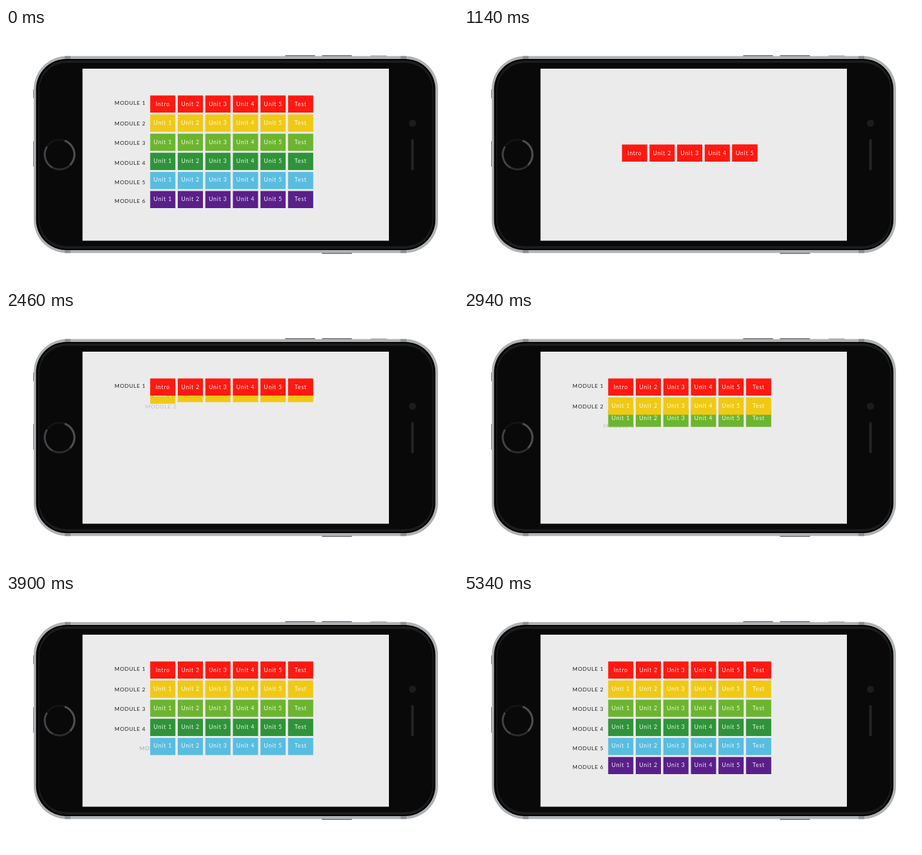
An HTML page with a canvas that plays this animation: 700x395 px, repeating every 5.37 s.

```html
<!DOCTYPE html>
<html lang="en">
<head>
<meta charset="utf-8">
<title>Course modules on a phone</title>
<style>
  html, body { margin: 0; width: 100%; height: 100%; overflow: hidden; background: #fff; }
  canvas { display: block; }
</style>
</head>
<body>
<canvas id="stage" width="700" height="395"></canvas>
<script>
const ctx = document.getElementById('stage').getContext('2d');
const LOOP = 5370, CUT = 60;
const COLORS = ['#fe1911', '#f0c915', '#6cb52f', '#2f9439', '#59bddf', '#5a1f8a'];
const PITCH_X = 42.7, PITCH_Y = 29.6, CELL_W = 39, CELL_H = 26.6;
const TOP = 104.5, MIDDLE = 180.4, LEFT = 223.3;
const LABEL_Y = [115.5, 147.5, 178, 208.5, 238.5, 267.5];

// Start times in ms
const UNIT_IN = [0, 90, 220, 350, 700, 1210];
const UNIT_MS = [0, 120, 120, 140, 240, 240];
const ROW_IN = [1725, 2363, 2805, 3248, 3655, 4105];
const LABEL_IN = [1980, 2400, 2880, 3350, 3795, 4250];

const clamp = v => Math.min(1, Math.max(0, v));
const linear = (t, start, ms) => clamp((t - start) / ms);
function ease(t, start, ms) {
  const u = linear(t, start, ms);
  return u < .5 ? 2 * u * u : 1 - 2 * (1 - u) ** 2;
}

function box(x, y, w, h, r, fill) {
  ctx.fillStyle = fill;
  ctx.beginPath();
  ctx.roundRect(x, y, w, h, r);
  ctx.fill();
}

function arc(x, y, r, from, to, color, width) {
  ctx.strokeStyle = color;
  ctx.lineWidth = width;
  ctx.beginPath();
  ctx.arc(x, y, r, from * Math.PI / 180, to * Math.PI / 180);
  ctx.stroke();
}

function write(text, x, y, size, spacing, align, color) {
  ctx.font = `${size}px Lato, sans-serif`;
  ctx.letterSpacing = spacing + 'px';
  ctx.textAlign = align;
  ctx.fillStyle = color;
  ctx.fillText(text, x, y + 3.1);
}

function phone() {
  // Side buttons
  for (const [x, y] of [[432, 42], [489, 42], [489, 346]]) box(x, y, 47, 4, 1.5, '#74767a');
  box(564, 42.5, 26, 4, 1.5, '#a3a6a9');
  box(42, 95, 4, 14, 1, '#808286');
  box(42, 175, 4, 40, 1, '#808286');

  // Metal rim with antenna bands
  box(43, 43.5, 626, 305, 51, '#aeb2b5');
  for (const x of [91, 611]) {
    box(x, 43.5, 9, 5, 0, '#8b8e91');
    box(x, 343.5, 9, 5, 0, '#8b8e91');
  }
  box(46.5, 48, 618.5, 296, 47, '#000');
  box(50, 50, 612, 292, 44, '#1c1c1d');
  box(51.5, 54, 609, 284, 42, '#090909');

  // Home button, camera and speaker
  arc(83, 196, 23, 0, 360, '#151517', 2.5);
  arc(83, 196, 23, 45, 118, '#2b2b30', 3);
  arc(83, 196, 23, 118, 212, '#424247', 3);
  arc(83, 196, 23, -70, 45, '#4d4d52', 3.2);
  box(624, 142, 11, 11, 5.5, '#1c1c1d');
  box(627.5, 172, 4, 48.5, 2, '#252526');

  box(118.5, 63, 474.5, 266.5, 0, '#ebebeb');
}

function cell(row, col, x, y) {
  box(x, y, CELL_W, CELL_H, 0, COLORS[row]);
  const name = col === 5 ? 'Test' : row + col === 0 ? 'Intro' : 'Unit ' + (col + 1);
  write(name, x + CELL_W / 2, y + 13.2 - row * .2, 8.9, .75, 'center', 'rgba(255,255,255,.9)');
}

// Columns fan out of one another while the row stays centred
function columns(t) {
  let x = LEFT + 2.5 * PITCH_X;
  for (let k = 1; k < 6; k++) {
    const lag = k > 3 ? 60 : 0;
    x -= PITCH_X / 2 * ease(t, UNIT_IN[k] + lag, UNIT_MS[k]);
  }
  return UNIT_IN.map((start, k) => x += k && PITCH_X * ease(t, start, UNIT_MS[k]));
}

function label(row, t) {
  const p = linear(t, LABEL_IN[row], 300);
  if (!p) return;
  ctx.globalAlpha = p;
  write('MODULE ' + (row + 1), 168 + 60 * (1 - p), LABEL_Y[row], 8.3, .7, 'left', '#222');
  ctx.globalAlpha = 1;
}

function draw(now) {
  const time = now % LOOP;
  const t = time < CUT ? LOOP : time;
  ctx.clearRect(0, 0, 700, 395);
  phone();
  for (let row = 0; row < 6; row++) label(row, t);

  const xs = columns(t);
  const rise = ease(t, ROW_IN[0], 250);
  for (let row = 5; row >= 0; row--) {
    if (row && t < ROW_IN[row] - 20) continue;
    for (let col = 5; col >= 0; col--) {
      const lead = row === 1 && col === 0 ? 12 : 0;
      const y = row
        ? TOP + PITCH_Y * (row - 1 + ease(t, ROW_IN[row] - lead, 237))
        : MIDDLE + (TOP - MIDDLE) * rise;
      cell(row, col, xs[col], y);
    }
  }
}

const begin = performance.now();
function tick() {
  draw(performance.now() - begin);
  requestAnimationFrame(tick);
}
tick();
</script>
</body>
</html>
```
